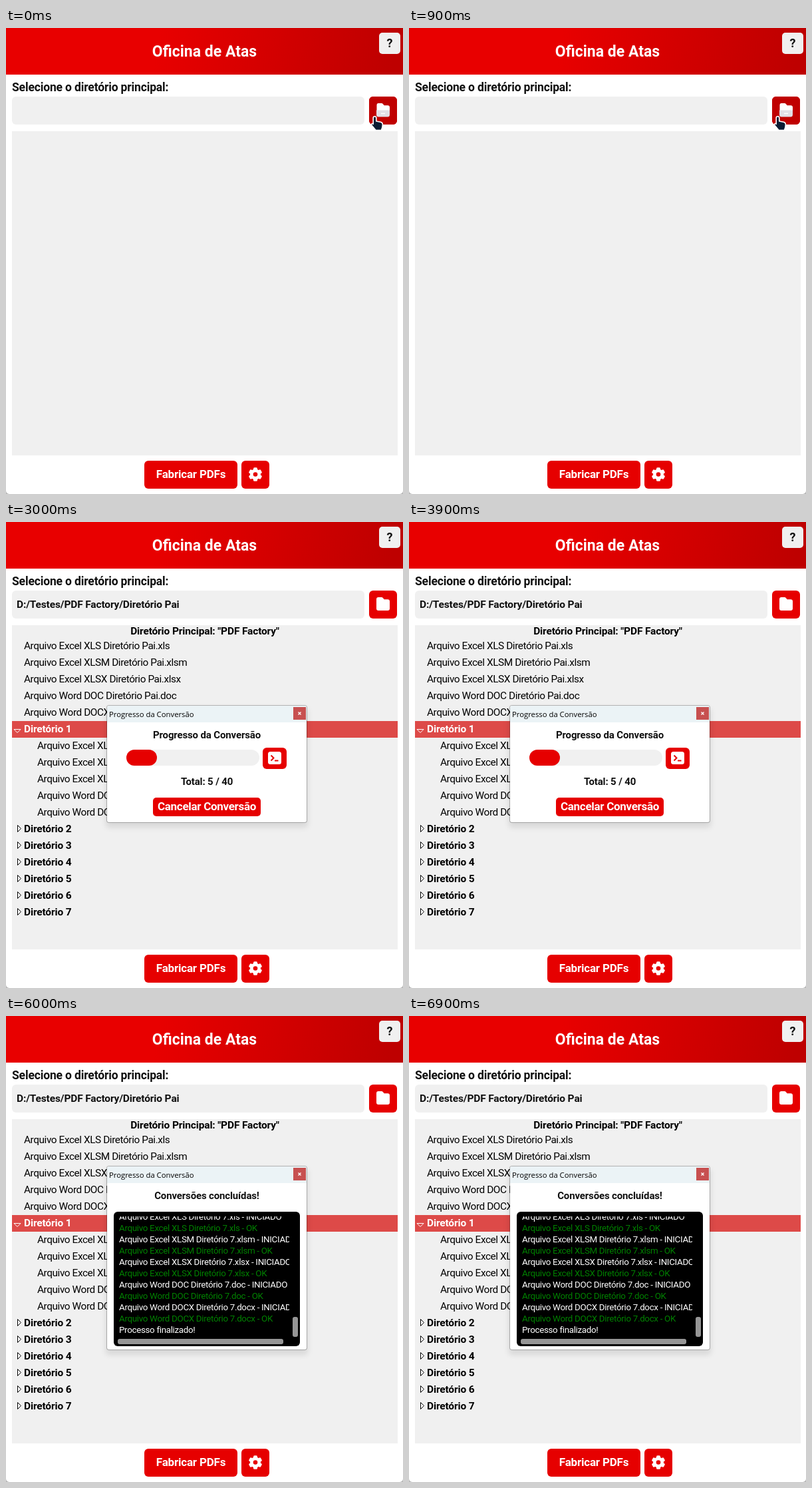
Animation, 597 px wide and 700 px high, one loop 7500 ms. Source, as an HTML page:

```html
<!DOCTYPE html>
<html lang="pt">
<head>
<meta charset="utf-8">
<title>Oficina de Atas</title>
<style>
html, body { margin: 0; width: 100%; height: 100%; overflow: hidden; background: #b4b4b4; }
#app {
  position: relative; width: 597px; height: 700px; overflow: hidden;
  background: #fff; border-radius: 0 0 5px 5px;
  font: 15.4px Roboto, "Open Sans", sans-serif; color: #111; white-space: nowrap;
  --red: #e60000; --dark: #c00000; --grey: #f0f0f0;
}
#app div, svg { position: absolute; }
svg { left: 0; top: 0; overflow: visible; }
.bold { font-weight: 700; font-size: 15.5px; letter-spacing: -.15px; }
.center { left: 0; width: 100%; text-align: center; }
.btn { background: var(--red); border-radius: 6px; color: #fff; text-align: center; font-weight: 700; font-size: 17px; }
.btn.hover { background: var(--dark); }

#header { inset: 0 0 auto; height: 70px; line-height: 71px; text-align: center; color: #fff;
  font-weight: 700; font-size: 23px; background: linear-gradient(100deg, #e80000 38%, #be0000 97%); }
#help { left: 561px; top: 7px; width: 32px; height: 32px; line-height: 31px; border-radius: 5px;
  background: var(--grey); text-align: center; font-weight: 700; font-size: 18px; }
#label { left: 9px; top: 79px; line-height: 21px; font-weight: 700; font-size: 17.5px; letter-spacing: -.15px; }
#entry { left: 9px; top: 103px; width: 530px; height: 42px; line-height: 42px; border-radius: 6px; background: var(--grey); }
#entry div { left: 7px; }
.browse { left: 546px; top: 103px; width: 42px; height: 42px; }
.convert { left: 208px; top: 650px; width: 140px; height: 42px; line-height: 41px; letter-spacing: -.2px; }
#gear { left: 354px; top: 650px; width: 42px; height: 42px; }

#panel { left: 9px; top: 155px; width: 580px; height: 487px; background: var(--grey); color: #000; }
#tree { inset: 0; }
#tree .row { left: 0; width: 100%; height: 25px; line-height: 25px; text-indent: 18px; }
#tree .file { letter-spacing: -.43px; }
#tree .child { text-indent: 38px; }
#tree .open { background: #dd4a48; color: #fff; }

#dialog { left: 152px; top: 276px; width: 300px; height: 175px; background: #fff; border-radius: 3px;
  box-shadow: 0 0 0 1px rgba(0, 0, 0, .25), 0 6px 9px 2px rgba(0, 0, 0, .1); }
#dialog .bold { font-size: 15px; line-height: 20px; }
#bar { inset: 0 0 auto; height: 25px; text-indent: 3px; background: #ebf3f6;
  font: 11.3px/25px "Open Sans", sans-serif; border-radius: 3px 3px 0 0; color: #000; }
#close { left: 280px; top: 2px; width: 19px; height: 19px; background: #c75050; }
#progress { inset: 0; }
#track { left: 29px; top: 66px; width: 200px; height: 24px; border-radius: 12px; background: var(--grey); }
#fill { left: 0; top: 0; width: 46px; height: 24px; border-radius: 12px; background: var(--red); }
#term { left: 234px; top: 63px; width: 36px; height: 32px; }
#cancel { left: 69px; top: 138px; width: 162px; height: 28px; line-height: 27px; border-radius: 5px; letter-spacing: -.3px; }

#log { left: 10px; bottom: 5px; width: 280px; height: 94px; border-radius: 6px; background: #000; }
#log .view { left: 7px; top: 7px; width: 257px; bottom: 16px; overflow: hidden; }
#log .lines { left: 1px; bottom: 0; color: #fff; font-size: 13.4px; letter-spacing: -.33px; }
#log .lines p { margin: 0; height: 17px; line-height: 17px; }
#log .ok { color: #008000; }
#partLog .lines { left: -12px; }
#log > .thumb { background: #969696; border-radius: 3px; }
#thumbY { left: 269px; bottom: 14px; width: 8px; height: 26px; }
#thumbX { left: 18px; bottom: 3px; width: 248px; height: 8px; }

.pick, .start, .filled, .early, .late, .done, .working, #dialog, #log, #fill, #thumbY, #thumbX {
  animation: 7.5s step-end infinite;
}
.pick { animation-name: pick; }
.start { animation-name: start; }
.filled { animation-name: filled; }
.early { animation-name: early; }
.late { animation-name: late; }
.done { animation-name: done; }
.working { animation-name: working; }
#dialog { animation-name: dialog; }
#log { animation-name: log; }
#fill { animation-name: fill; }
#thumbY { animation-name: thumb-y; }
#thumbX { animation-name: thumb-x; }
@keyframes pick { 0% { opacity: 1; } 20%, 100% { opacity: 0; } }
@keyframes start { 0% { opacity: 0; } 20% { opacity: 1; } 40%, 100% { opacity: 0; } }
@keyframes filled { 0% { opacity: 0; } 20%, 100% { opacity: 1; } }
@keyframes early { 0% { opacity: 1; } 60%, 100% { opacity: 0; } }
@keyframes late { 0% { opacity: 0; } 60% { opacity: 1; } 80%, 100% { opacity: 0; } }
@keyframes done { 0% { opacity: 0; } 80%, 100% { opacity: 1; } }
@keyframes working { 0% { opacity: 1; } 80%, 100% { opacity: 0; } }
@keyframes dialog {
  0% { opacity: 0; top: 276px; height: 175px; }
  40% { opacity: 1; top: 276px; height: 175px; }
  60%, 100% { opacity: 1; top: 226px; height: 275px; }
}
@keyframes log {
  0% { opacity: 0; height: 94px; }
  60% { opacity: 1; height: 94px; }
  80%, 100% { opacity: 1; height: 202px; }
}
@keyframes fill { 0% { width: 46px; } 60%, 100% { width: 138px; } }
@keyframes thumb-y { 0% { height: 26px; } 80%, 100% { height: 30px; } }
@keyframes thumb-x { 0% { left: 18px; width: 248px; } 80%, 100% { left: 6px; width: 249px; } }
</style>
</head>
<body>
<div id="app">
  <div id="header">Oficina de Atas</div>
  <div id="help">?</div>
  <div id="label">Selecione o diretório principal:</div>
  <div id="entry"><div class="bold filled">D:/Testes/PDF Factory/Diretório Pai</div></div>

  <div class="btn browse">
    <svg class="filled" width="42" height="42" fill="#fff">
      <path d="M14 10h4.500q1.500 0 2.500 1.200l1.600 2H28q3 0 3 3V27q0 3-3 3H14q-3 0-3-3V13q0-3 3-3z"/>
    </svg>
  </div>
  <div class="btn browse hover pick">
    <svg width="42" height="42">
      <path d="M14 10h4.500q1.500 0 2.500 1.200l1.600 2H28q3 0 3 3V24H11.500V13q0-3 2.500-3z" fill="#fff"/>
      <path d="M11 20.500h20v6.500q0 3.500-3 3.500H14q-3 0-3-3.500z" fill="#e2dfe6"/>
      <path d="M18 25.500h6" stroke="#fff" stroke-width="1.500"/>
    </svg>
  </div>

  <div id="panel">
    <div id="tree" class="filled">
      <div class="center bold" style="top: 0; line-height: 19px">Diretório Principal: "PDF Factory"</div>
    </div>
  </div>

  <div class="btn convert">Fabricar PDFs</div>
  <div class="btn convert hover start">Fabricar PDFs</div>
  <div id="gear" class="btn">
    <svg width="42" height="42" fill="#fff">
      <g transform="translate(21 20.500)">
        <rect id="tooth" x="-3" y="-10.200" width="6" height="20.400" rx="1.500"/>
        <use href="#tooth" transform="rotate(60)"/>
        <use href="#tooth" transform="rotate(120)"/>
        <circle r="8"/>
        <circle r="3.300" fill="#e60000"/>
      </g>
    </svg>
  </div>

  <svg width="597" height="700" fill="#0b1c33" stroke="#fff" stroke-width="1.600" stroke-linejoin="round">
    <defs>
      <path id="hand" d="M3.200 3a2.300 2.300 0 0 1 4.600 0V8l6.400 1.200q3.200 .8 3.200 3.500 0 4.500-2 8.800H7L1 14.200q-1.200-2 .5-2.700 1-.2 1.700 .8z"/>
    </defs>
    <use href="#hand" x="549" y="132" class="pick"/>
    <use href="#hand" x="334" y="674" class="start"/>
  </svg>

  <div id="dialog">
    <div id="bar">Progresso da Conversão</div>
    <div id="close">
      <svg width="19" height="19"><path d="M7.500 7.500l4 4m0-4l-4 4" stroke="#fff" stroke-width="1.300"/></svg>
    </div>
    <div id="progress" class="working">
      <div class="center bold" style="top: 34px">Progresso da Conversão</div>
      <div id="track"><div id="fill"></div></div>
      <div id="term" class="btn">
        <svg width="36" height="32" fill="none" stroke="#e60000" stroke-width="2">
          <rect x="8" y="6" width="20" height="19" rx="3.500" fill="#fff" stroke="none"/>
          <path d="M12.500 11.500l4 4-4 4M18 19.500h5.500"/>
        </svg>
      </div>
      <div class="center bold early" style="top: 104px">Total: 5 / 40</div>
      <div class="center bold late" style="top: 104px">Total: 26 / 40</div>
      <div id="cancel" class="btn">Cancelar Conversão</div>
    </div>
    <div class="center bold done" style="top: 34px">Conversões concluídas!</div>
    <div id="log">
      <div id="partLog" class="view late"><div class="lines"></div></div>
      <div id="fullLog" class="view done"><div class="lines"></div></div>
      <div id="thumbY" class="thumb"></div>
      <div id="thumbX" class="thumb"></div>
    </div>
  </div>
</div>

<script>
const kinds = ['Excel XLS', 'Excel XLSM', 'Excel XLSX', 'Word DOC', 'Word DOCX'];
const folders = ['Pai', 1, 2, 3, 4, 5, 6, 7];
const filesIn = folder => kinds.map(kind =>
  `Arquivo ${kind} Diretório ${folder}.${kind.split(' ')[1].toLowerCase()}`);

// Directory tree
const tree = document.getElementById('tree');
let rowTop = 19;
function addRow(text, type, icon = '') {
  const row = document.createElement('div');
  row.className = 'row ' + type;
  row.style.top = rowTop + 'px';
  row.innerHTML = icon + text;
  tree.append(row);
  rowTop += 25;
}
const arrow = (path, color, fill) =>
  `<svg width="20" height="25"><path d="${path}" stroke="${color}" fill="${fill}"/></svg>`;

filesIn('Pai').forEach(name => addRow(name, 'file'));
addRow('Diretório 1', 'bold open', arrow('M3 12.500h10l-5 5z', '#fff', 'none'));
filesIn(1).forEach(name => addRow(name, 'file child'));
folders.slice(2).forEach(n =>
  addRow('Diretório ' + n, 'bold', arrow('M8.500 6.500v10l5-5z', '#000', '#fff')));

// Conversion log
const files = folders.flatMap(filesIn);
const logOf = list => list.flatMap(name => [name + ' - INICIADO', name + ' - OK']);
function showLog(id, lines) {
  document.querySelector(`#${id} .lines`).innerHTML = lines
    .map(line => `<p class="${line.endsWith('OK') ? 'ok' : ''}">${line}</p>`).join('');
}
showLog('partLog', logOf(files.slice(0, 26)).slice(0, -1).slice(-5));
showLog('fullLog', [...logOf(files), 'Processo finalizado!'].slice(-11));
</script>
</body>
</html>
```
